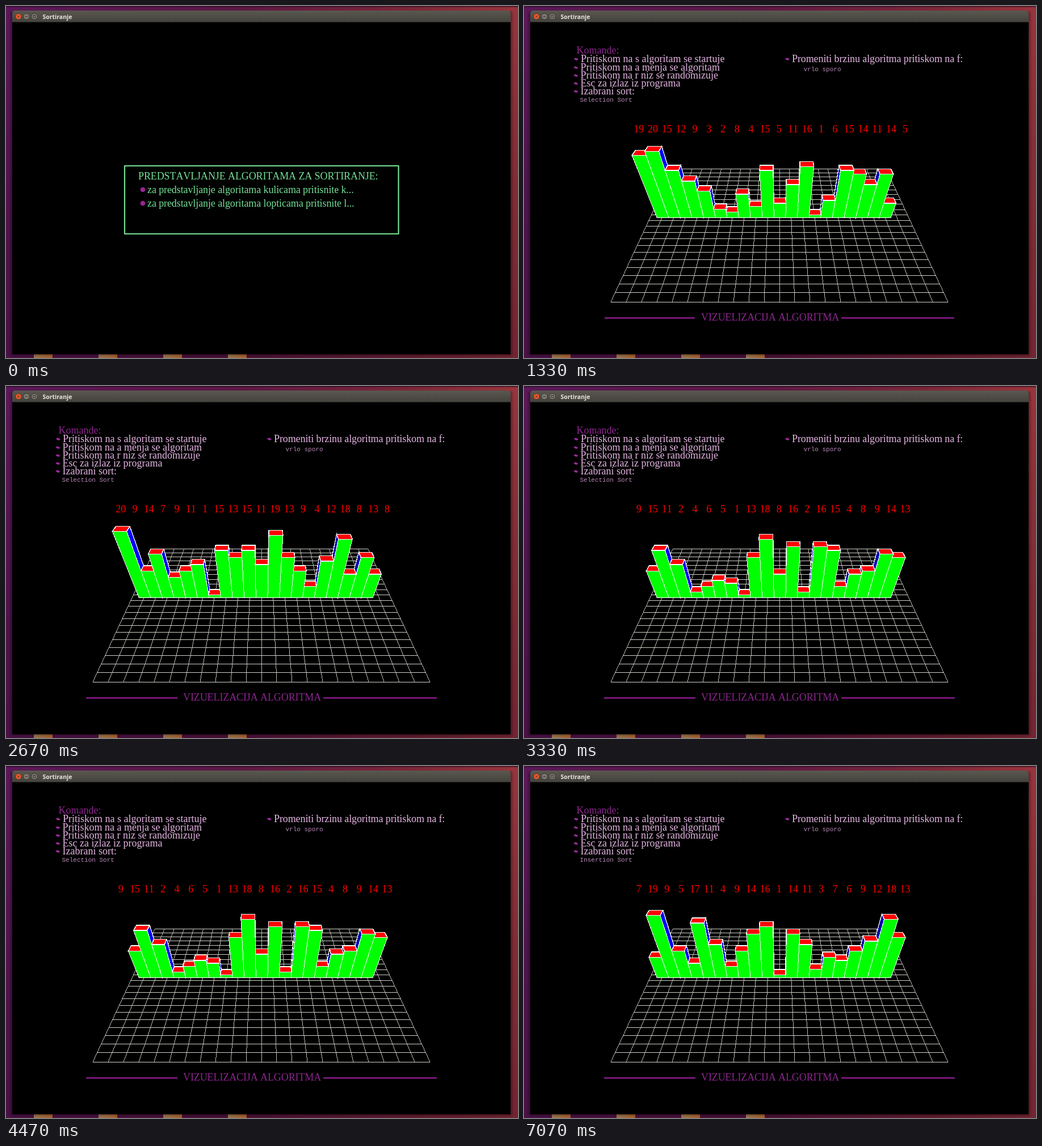
Write an HTML page that moves like this. It is 902 px wide and 621 px high and loops after 8000 ms.

```html
<!DOCTYPE html>
<html lang="sr">
<head>
<meta charset="utf-8">
<title>Sortiranje</title>
<style>
html, body { margin: 0; width: 100%; height: 100%; overflow: hidden; background: #000; }
svg { display: block; width: 902px; height: 621px; }
text { white-space: pre; }
.serif { font: 18px "Liberation Serif", serif; font-kerning: none; }
.tight { letter-spacing: -.1px; }
.mono { font: 11px "Liberation Mono", monospace; fill: #b98ab9; }
.title { font: bold 10.5px "Open Sans", "Noto Sans", sans-serif; fill: #e8e4dc; }
.green { fill: #74e096; }
.purple { fill: #8e2691; }
.pink { fill: #e6b6e4; }
.red { fill: #f00; text-anchor: middle; }
.crisp { shape-rendering: crispEdges; }
</style>
</head>
<body>
<svg id="stage" viewBox="0 0 902 621">
  <defs>
    <linearGradient id="desk">
      <stop offset="0" stop-color="#5a1858"/>
      <stop offset=".45" stop-color="#5c1744"/>
      <stop offset=".8" stop-color="#7c2838"/>
      <stop offset="1" stop-color="#98343c"/>
    </linearGradient>
    <linearGradient id="shade" x2="0" y2="1">
      <stop offset="0" stop-color="#000" stop-opacity="0"/>
      <stop offset="1" stop-color="#200018" stop-opacity=".3"/>
    </linearGradient>
    <linearGradient id="bar" x2="0" y2="1">
      <stop offset="0" stop-color="#5a5850"/>
      <stop offset="1" stop-color="#3d3c37"/>
    </linearGradient>
    <linearGradient id="folder">
      <stop offset="0" stop-color="#9c7a52"/>
      <stop offset="1" stop-color="#b0622f"/>
    </linearGradient>
  </defs>
  <g id="desktop"></g>
  <g id="intro"></g>
  <g id="scene"></g>
</svg>
<script>
const LOOP = 8000;
// Start time, selected algorithm, values; an empty list means the intro panel.
const STATES = [
  [0, '', []],
  [930, 'Selection Sort', [19, 20, 15, 12, 9, 3, 2, 8, 4, 15, 5, 11, 16, 1, 6, 15, 14, 11, 14, 5]],
  [1930, 'Selection Sort', [20, 9, 14, 7, 9, 11, 1, 15, 13, 15, 11, 19, 13, 9, 4, 12, 18, 8, 13, 8]],
  [3330, 'Selection Sort', [9, 15, 11, 2, 4, 6, 5, 1, 13, 18, 8, 16, 2, 16, 15, 4, 8, 9, 14, 13]],
  [5000, 'Selection Sort', [7, 19, 9, 5, 17, 11, 4, 9, 14, 16, 1, 14, 11, 3, 7, 6, 9, 12, 18, 13]]
];
STATES.push([6930, 'Insertion Sort', STATES[4][2]]);

const $ = id => document.getElementById(id);

function add(parent, tag, attrs, content) {
  const el = document.createElementNS('http://www.w3.org/2000/svg', tag);
  for (const key in attrs) el.setAttribute(key, attrs[key]);
  if (content !== undefined) el.textContent = content;
  parent.appendChild(el);
  return el;
}
const label = (g, x, y, cls, s) => add(g, 'text', { x, y, class: cls }, s);
const box = (g, x, y, width, height, fill, rx = 0) =>
  add(g, 'rect', { x, y, width, height, fill, rx });
const line = (g, [x1, y1], [x2, y2], stroke, width) =>
  add(g, 'line', { x1, y1, x2, y2, stroke, 'stroke-width': width });
const poly = (g, points, fill, width) =>
  add(g, 'polygon', { points: points.join(' '), fill, stroke: '#fff', 'stroke-width': width });

// Pitched camera: x across, y up, z away from the front edge of the floor.
const FOCAL = 507.5, SIN = .6535, COS = .758;
function project(x, y, z) {
  const depth = 18.8 + z * COS - y * SIN;
  const rise = -7.427 + z * SIN + y * COS;
  return [450 + FOCAL * x / depth, 321.5 - FOCAL * rise / depth];
}

const CELLS = 22, ROW = .6545, GRID = '#d0d0c8';
const BAR_Z = 7.54, BAR_DEPTH = .65, BAR_X = -10.42, BAR_W = .995, UNIT = .335;

function drawDesktop(g) {
  box(g, 0, 0, 902, 621, 'url(#desk)');
  box(g, 0, 0, 902, 621, 'url(#shade)');
  box(g, 0, 0, 902, 2, 'rgba(30,5,25,.55)');
  for (let i = 0; i < 4; i++) box(g, 49 + 114 * i, 614, 33, 7, 'url(#folder)');
  // Soft shadow around the window.
  for (const spread of [1.5, 3, 5])
    box(g, 11 - spread, 9, 878 + 2 * spread, 605.5 + spread, 'rgba(0,0,0,.1)', 5);
  box(g, 11, 8, 878, 26, 'url(#bar)', 5);
  box(g, 11, 28.5, 878, 586, '#000');
  ['#ea5a2a', '#7c7a70', '#7c7a70'].forEach((fill, i) =>
    add(g, 'circle', { cx: 22 + 14 * i, cy: 18.5, r: 5.3, fill, stroke: '#33322d', 'stroke-width': .8 }));
  add(g, 'path', {
    d: 'M20 16.5l4 4m0-4l-4 4M33.5 18.5h5M48 16.5h4v4h-4z',
    fill: 'none', stroke: '#3a3530', 'stroke-width': 1
  });
  label(g, 64.5, 22.5, 'title', 'Sortiranje');
}

function drawIntro(g) {
  add(g, 'rect', {
    x: 209, y: 282, width: 482.5, height: 120,
    fill: 'none', stroke: '#74e096', 'stroke-width': 2.2, 'stroke-linejoin': 'round'
  });
  label(g, 233, 306, 'serif tight green', 'PREDSTAVLJANJE ALGORITAMA ZA SORTIRANJE:');
  ['kulicama pritisnite k...', 'lopticama pritisnite l...'].forEach((end, i) => {
    add(g, 'circle', { cx: 241, cy: 324 + 24 * i, r: 4.3, fill: '#9a2494' });
    label(g, 249, 330 + 24 * i, 'serif tight green', 'za predstavljanje algoritama ' + end);
  });
}

function drawCommands(g) {
  const item = (x, y, s, cls = '') => {
    add(g, 'path', {
      d: `M${x - 12} ${y - 6}q2-2.5 5-1l2.5 1.5q0 2.5-3 2.3t-4.5-2.8z`,
      fill: '#9c2a9c'
    });
    label(g, x, y, 'serif pink ' + cls, s);
  };
  label(g, 92.5, 83.5, 'serif purple', 'Komande:');
  item(100, 99, 'Pritiskom na s algoritam se startuje');
  item(99.5, 114, 'Pritiskom na a menja se algoritam');
  item(99.5, 128, 'Pritiskom na r niz se randomizuje');
  item(99.5, 142, 'Esc za izlaz iz programa');
  item(99.5, 156, 'Izabrani sort:');
  item(472, 99, 'Promeniti brzinu algoritma pritiskom na f:', 'tight');
  label(g, 492.5, 114.5, 'mono', 'vrlo sporo');
  label(g, 312, 554.5, 'serif tight purple', 'VIZUELIZACIJA ALGORITMA');
}

function drawFloor(g) {
  const half = CELLS / 2, far = CELLS * ROW;
  for (let i = 0; i <= CELLS; i++) {
    const x = i - half;
    line(g, project(x, 0, 0), project(x, 0, far), GRID, .9);
    const [left, right] = [-half, half].map(side => {
      const [px, py] = project(side, 0, i * ROW);
      return [px, Math.floor(py + .02) + .5];
    });
    line(g, left, right, GRID, 1);
  }
}

function drawBar(g, i, value) {
  const x0 = BAR_X + i * BAR_W, x1 = x0 + BAR_W, top = value * UNIT;
  const near = BAR_Z, back = BAR_Z + BAR_DEPTH;
  const sideX = x1 < 0 ? x1 : x0;
  if (x0 > 0 || x1 < 0)
    poly(g, [project(sideX, 0, near), project(sideX, 0, back),
      project(sideX, top, back), project(sideX, top, near)], x1 < 0 ? '#00f' : '#0000b0', 1.3);
  poly(g, [project(x0, 0, near), project(x1, 0, near),
    project(x1, top, near), project(x0, top, near)], '#0f0', 1);
  poly(g, [project(x0, top, near), project(x1, top, near),
    project(x1, top, back), project(x0, top, back)], '#f00', 1.5);
}

function drawData(g, sort, values, first) {
  const grow = first ? 0 : 1;
  line(g, [142 - grow, 550.3], [301 + grow, 550.3], '#961e98', 2.2);
  line(g, [559, 550.3], [758 + grow, 550.3], '#961e98', 2.2);
  label(g, 98.5, 169, 'mono', sort);
  values.forEach((v, i) => label(g, 202.3 + 24.7 * i, 223, 'serif red', v));
  // Outermost bars first, so that bars nearer the middle cover them.
  const bars = add(g, 'g', { class: 'crisp' });
  const order = values.map((_, i) => i).sort((a, b) => Math.abs(b - 10) - Math.abs(a - 10));
  order.forEach(i => drawBar(bars, i, values[i]));
}

drawDesktop($('desktop'));
drawIntro($('intro'));
drawCommands($('scene'));
drawFloor(add($('scene'), 'g', { class: 'crisp' }));
const views = STATES.map(([, sort, values], i) => {
  const g = add($('scene'), 'g', {});
  if (values.length) drawData(g, sort, values, i === 1);
  return g;
});

let shown = -1;
const start = performance.now();
function tick(now) {
  const t = Math.max(0, now - start) % LOOP;
  const current = STATES.filter(s => s[0] <= t).length - 1;
  if (current !== shown) {
    shown = current;
    $('intro').style.display = current ? 'none' : '';
    $('scene').style.display = current ? '' : 'none';
    views.forEach((g, i) => { g.style.display = i === current ? '' : 'none'; });
  }
  requestAnimationFrame(tick);
}
tick(start);
</script>
</body>
</html>
```
